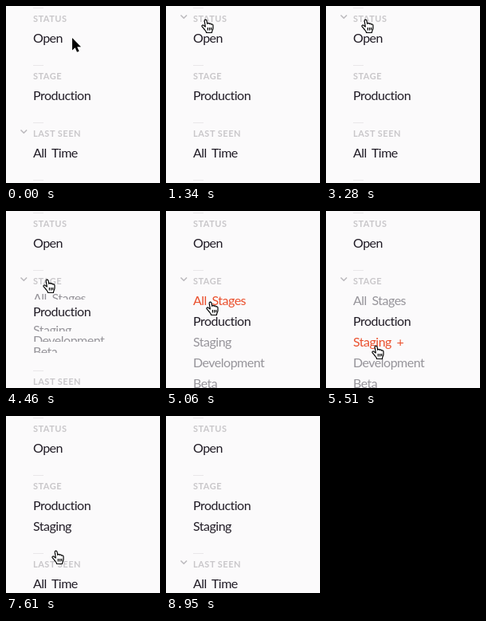
Write an HTML page that moves like this. It is 193 by 222 pixels and loops after 9.36 s.

```html
<!DOCTYPE html>
<html lang="en">
<head>
<meta charset="utf-8">
<title>Filter list</title>
<style>
  html, body { margin: 0; width: 100%; height: 100%; overflow: hidden; background: #fbfafb; }
  #stage { display: block; width: 193px; height: 222px; }
  text { font-family: Lato, "Open Sans", sans-serif; }
  .head { font-size: 11px; font-weight: 700; letter-spacing: .5px; fill: #c9c7ca; }
  .item { font-size: 16px; letter-spacing: -.5px; word-spacing: 3px; fill: #96949a; }
  .on { fill: #211c26; }
  .hot { fill: #ea4f2c; }
  .rule { fill: #e9e7e9; }
  .chevron { fill: none; stroke: #bab8bc; stroke-width: 1.5; }
  .hand { fill: #fff; stroke: #000; stroke-width: 1.2; stroke-linejoin: round; }
  .arrow { fill: #000; stroke: #fff; stroke-width: 1.2; paint-order: stroke; }
</style>
</head>
<body>
<svg id="stage" viewBox="0 0 193 222"></svg>
<script>
const LOOP = 9360, ROW = 26, LEFT = 34;
const STATUS = 0, STAGE = 1, SEEN = 2;

const groups = [
  { name: 'STATUS', items: ['All Statuses', 'Open', 'Closed'], on: ['Open'] },
  { name: 'STAGE', items: ['All Stages', 'Production', 'Staging', 'Development', 'Beta'], on: ['Production'] },
  { name: 'LAST SEEN', items: ['All Time'], on: ['All Time'] },
  { name: '', items: [], on: [] }
];

// Each track: [start ms, ...values], held until the next step.
const pointer = [
  [0, 'arrow', 83, 40], [150, 'arrow', 67, 27], [450, 'hand', 53, 34], [600, 'hand', 44, 39],
  [1200, 'hand', 44, 27], [1340, 'hand', 44, 16],
  [3570, 'hand', 44, 27], [3720, 'hand', 45, 50], [3860, 'hand', 46, 73], [4010, 'hand', 46, 85],
  [4910, 'hand', 47, 97], [5060, 'hand', 50, 113], [5210, 'hand', 52, 133],
  [5360, 'hand', 55, 154], [5510, 'hand', 57, 168],
  [8500, 'hand', 90, 180], [8650, 'arrow', 122, 192], [8800, 'arrow', 146, 208], [8950, '', 0, 0]
];
const chevron = [[0, SEEN], [1340, STATUS], [3720, -1], [3860, STAGE], [7610, -1], [8500, SEEN]];
const opening = [
  [0, -1, 0], [2090, STATUS, 1], [3280, -1, 0], [4460, STAGE, .52], [4610, STAGE, 1],
  [6260, STAGE, .15], [6410, STAGE, .013], [7610, -1, 0]
];
const hover = [[0, ''], [5060, 'All Stages'], [5210, 'Production'], [5360, 'Staging'], [6260, '']];
const stagingOn = [[0, false], [6260, true]];

const shapes = {
  arrow: '<path class="arrow" d="M0 0V15.5L3.6 12.2L6 17.8L8.6 16.7L6.2 11.2H11Z"/>',
  hand: '<path class="hand" d="M5.4 10L4.2 2.9C4 .7 6.5 .4 7 2.3L7.8 6.3C8.3 5.1 10.1 5.2 10.4 6.5' +
    'C11 5.6 12.6 5.9 12.8 7.1C13.6 6.5 15 7 15 8.5V11.5C15 14 13.6 14.6 13.4 17.5H6.6' +
    'C6.6 15.5 4.5 14 3.4 12.4L1.2 9.8C.3 8.4 2.1 7.4 3.2 8.4ZM8.4 11v3.5M10.6 11v3.5M12.7 11v3"/>'
};

const at = (track, t) => track.findLast(step => step[0] <= t).slice(1);

function row(label, y, on, p, hot) {
  const grow = on ? 1 : p;
  const clip = grow < 1 ? 21 * grow : ROW;
  const mark = hot && label !== 'All Stages' ? `<tspan dx="6.5">${on ? '−' : '+'}</tspan>` : '';
  const cls = hot ? 'hot' : on ? 'on' : '';
  return `<svg x="0" y="${y}" width="193" height="${clip}" overflow="hidden">` +
    `<text class="item ${cls}" x="${LEFT}" y="${11 + 7 * grow}">${label}${mark}</text></svg>`;
}

function render(t) {
  const [kind, px, py] = at(pointer, t);
  const [marked] = at(chevron, t);
  const [open, amount] = at(opening, t);
  const [hot] = at(hover, t);
  const [staging] = at(stagingOn, t);
  let y = 0, out = '';
  groups.forEach((g, i) => {
    const p = i === open ? amount : 0;
    out += `<rect class="rule" x="${LEFT}" y="${y + 2}" width="13" height="1"/>` +
      `<text class="head" x="${LEFT}" y="${y + 19.5}">${g.name}</text>`;
    if (i === marked) out += `<path class="chevron" d="M18.5 ${y + 11.5}l3.8 3.8l3.8 -3.8"/>`;
    y += 28;
    for (const label of g.items) {
      const on = g.on.includes(label) || (staging && label === 'Staging');
      if (on || p) out += row(label, Math.round(y), on, p, label === hot);
      y += on ? ROW : ROW * p;
    }
    y = Math.round(y + 18);
  });
  if (kind) out += `<g transform="translate(${px} ${py})">${shapes[kind]}</g>`;
  return out;
}

const stage = document.getElementById('stage');
const start = performance.now();
let shown = '';
function tick() {
  const next = render((performance.now() - start) % LOOP);
  if (next !== shown) stage.innerHTML = shown = next;
  requestAnimationFrame(tick);
}
tick();
</script>
</body>
</html>
```
